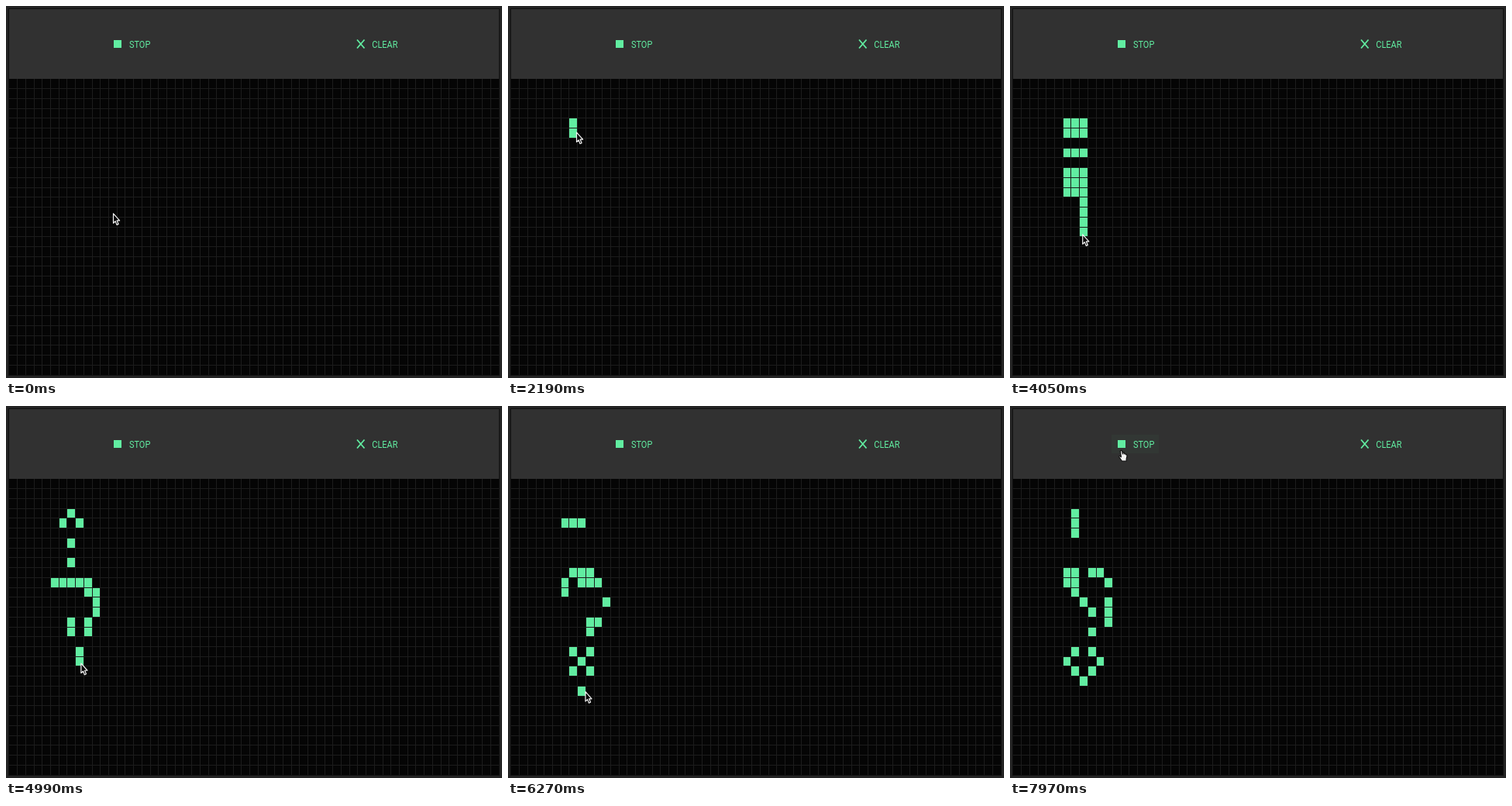
Write an HTML page with a canvas that moves like this. It is 640 px wide and 480 px high and loops after 8 s.

```html
<!DOCTYPE html>
<html lang="en">
<head>
<meta charset="utf-8">
<title>Game of Life</title>
<style>
  html, body { margin: 0; width: 100%; height: 100%; overflow: hidden; background: #222; }
  canvas { display: block; width: 640px; height: 480px; }
</style>
</head>
<body>
<canvas id="stage" width="640" height="480"></canvas>
<script>
const ctx = document.getElementById('stage').getContext('2d');

const LOOP = 8000, SLICE = 10;
const COLS = 59, ROWS = 30;
const LEFT = 4, TOP = 94, CELL_W = 632 / COLS, CELL_H = 382 / ROWS;
const ASPECT = CELL_W / CELL_H;
const TICK = 280, GENERATION = 2 * TICK, FIRST_TICK = 1910;
const PRESS = 1930, RELEASE = 6390, ARRIVE = 7690, HOVER = 7790;
const GREEN = '#61eda1', PANEL = '#313131', FRAME = '#242424', LINE = '#1c1c1c', NIGHT = '#050505';

// Height of the pointer while it draws: time, y
const drag = [
  [PRESS, 149], [3030, 205], [3310, 221.6], [3480, 249.5], [4040, 294],
  [4990, 331.3], [5270, 349.5], [5830, 362], [RELEASE, 369.5]
];

const mix = (a, b, k) => a + (b - a) * k;
const progress = (t, from, to) => Math.min(1, Math.max(0, (t - from) / (to - from)));
const smooth = k => k * k * (3 - 2 * k);
const bend = (a, b, c, k) => mix(mix(a, b, k), mix(b, c, k), k);

// The pointer stalls just before every tick.
function stalled(t) {
  return t < FIRST_TICK ? t : t - Math.max(0, (t - FIRST_TICK) % TICK - 170);
}

function pointerAt(time) {
  const t = stalled(time);
  if (t < PRESS) {
    const k = smooth(progress(t, 130, 830));
    return [mix(138, 88, k), mix(267, 149, k)];
  }
  if (t < RELEASE) {
    const i = drag.findIndex(([end]) => end > t);
    const [t0, y0] = drag[i - 1], [t1, y1] = drag[i];
    const y = mix(y0, y1, progress(t, t0, t1));
    return [Math.max(88, 89.5 + (y - 249.5) * 0.084), y];
  }
  const k = smooth(progress(t, RELEASE, ARRIVE));
  return [bend(99.6, 260, 145, k), bend(369.5, 370, 57, k)];
}

function nextGeneration(live) {
  const neighbours = new Map();
  for (const id of live) {
    for (const dy of [-COLS, 0, COLS]) {
      for (const dx of [-1, 0, 1]) {
        if (dx || dy) neighbours.set(id + dx + dy, (neighbours.get(id + dx + dy) || 0) + 1);
      }
    }
  }
  const born = new Set();
  for (const [id, n] of neighbours) {
    if (n === 3 || (n === 2 && live.has(id))) born.add(id);
  }
  return born;
}

function simulate() {
  const history = [];
  let live = new Set();
  for (let t = 0; t < LOOP; t += SLICE) {
    if (t >= FIRST_TICK && (t - FIRST_TICK) % GENERATION === 0) live = nextGeneration(live);
    if (t >= PRESS && t < RELEASE) {
      const [x, y] = pointerAt(t);
      const id = Math.floor((y - TOP) / CELL_H) * COLS + Math.floor((x - LEFT) / CELL_W);
      if (!live.has(id)) live = new Set(live).add(id);
    }
    history.push(live);
  }
  return history;
}

const lineX = c => Math.floor(LEFT + c * CELL_W);
const lineY = r => Math.floor(TOP + r * CELL_H);

function box(color, x, y, w, h) {
  ctx.fillStyle = color;
  ctx.fillRect(x, y, w, h);
}

function label(text, x) {
  ctx.save();
  ctx.translate(x, 53.5);
  ctx.scale(ASPECT, 1);
  ctx.font = '13px Roboto, sans-serif';
  ctx.fillStyle = GREEN;
  ctx.fillText(text, 0, 0);
  ctx.restore();
}

function drawHeader(t) {
  box(FRAME, 0, 0, 640, 480);
  box('#111', 3, 3, 634, 474);
  box(PANEL, 4, 4, 632, 90);
  ctx.globalAlpha = 0.03 * progress(t, HOVER, HOVER + 180);
  box(GREEN, 131, 37, 61, 24);
  ctx.globalAlpha = 1;

  box(GREEN, 139, 44, 10, 10);
  label('STOP', 159);
  ctx.strokeStyle = GREEN;
  ctx.lineWidth = 1.8;
  ctx.stroke(new Path2D('M453 43.5L462.5 54.5M462.5 43.5L453 54.5'));
  label('CLEAR', 472.3);
}

function drawGrid(live) {
  box(NIGHT, 4, TOP, 632, 382);
  for (let c = 1; c < COLS; c++) box(LINE, lineX(c), TOP, 1, 382);
  for (let r = 1; r < ROWS; r++) box(LINE, 4, lineY(r), 632, 1);
  for (const id of live) {
    const c = id % COLS, r = Math.floor(id / COLS);
    const x = lineX(c) + 1, y = lineY(r) + 1;
    box(GREEN, x, y, lineX(c + 1) - x, lineY(r + 1) - y);
  }
}

const arrow = new Path2D('M.5 .8V13.2L3.1 10.7L5 15.4L7.1 14.4L5.2 9.9H8.6Z');
const hand = new Path2D('M-2.6 1.2Q-1.4-.4-.4 1.2L.6 5Q2-.2 2.8 5Q4.2 4.2 4.6 5.8Q6.2 5.4 6 7.6' +
  'L5.2 11.4V14H-.6L-4.2 8.8Q-4.6 7.2-3 7.8L-1.6 8.8Z');

function drawPointer(t) {
  const [x, y] = pointerAt(t), hovering = t >= HOVER;
  const shape = hovering ? hand : arrow;
  ctx.save();
  ctx.translate(x, y);
  ctx.lineJoin = 'round';
  ctx.lineWidth = 1.2;
  ctx.fillStyle = hovering ? '#f4f4f4' : '#050505';
  ctx.strokeStyle = hovering ? '#111' : '#f4f4f4';
  ctx.fill(shape);
  ctx.stroke(shape);
  ctx.restore();
}

const history = simulate();
const start = performance.now();

function render() {
  const t = (performance.now() - start) % LOOP;
  drawHeader(t);
  drawGrid(history[Math.floor(t / SLICE)]);
  drawPointer(t);
  requestAnimationFrame(render);
}
render();
</script>
</body>
</html>
```
